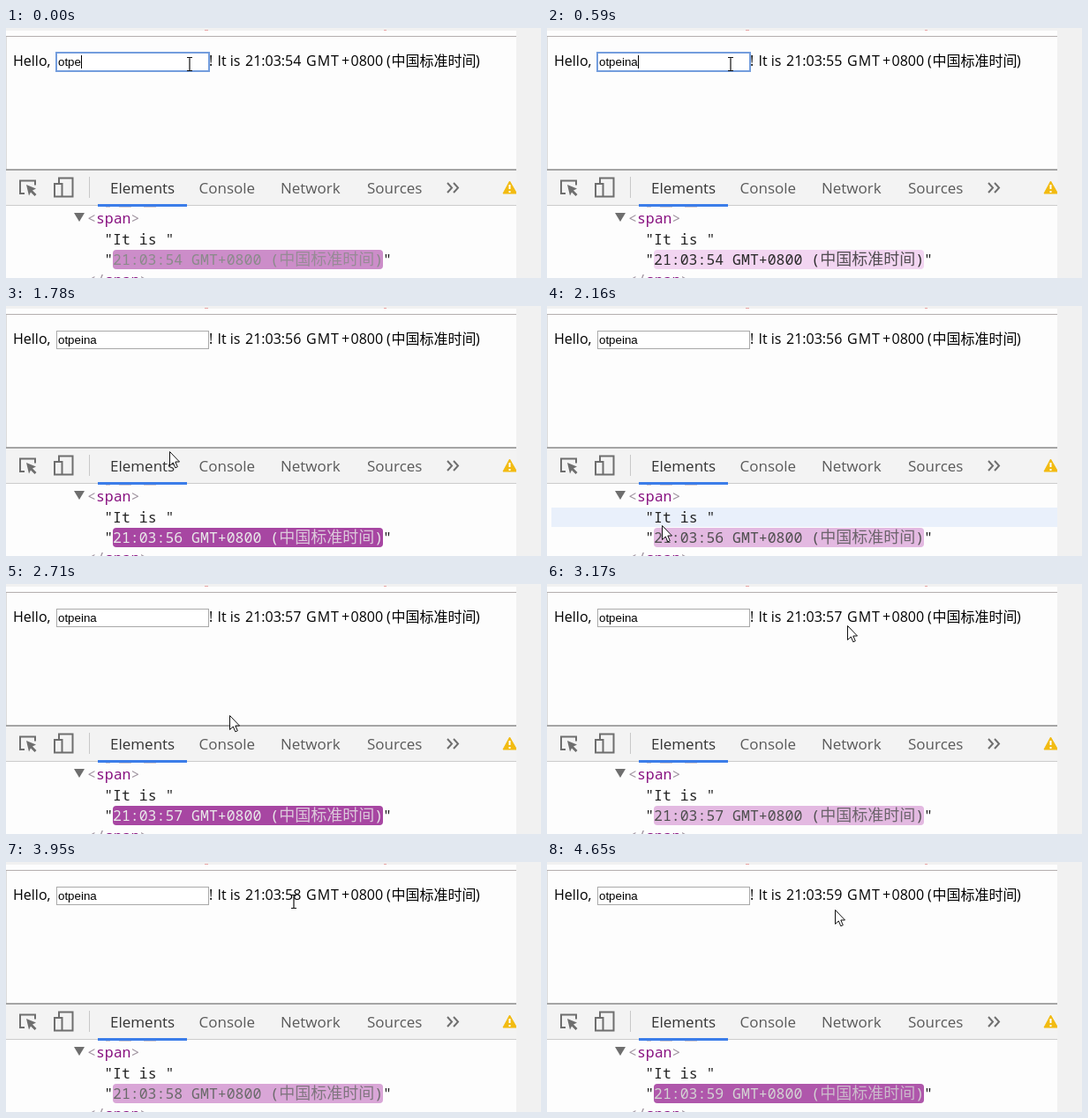
These frames come from a looping animation (606 px wide and 284 px high, 4.89 s). An HTML page:

```html
<!DOCTYPE html>
<html lang="zh">
<head>
<meta charset="utf-8">
<title>Live clock in the inspector</title>
<style>
  html, body { margin: 0; width: 100%; height: 100%; overflow: hidden; background: #f1f1f1; }
  svg { display: block; width: 606px; height: 284px; }
  text { white-space: pre; }
  .page { font: 16px "Open Sans", "Noto Sans", "Noto Sans CJK SC", sans-serif; fill: #000; }
  .cjk { font-family: "Noto Sans CJK SC", "Noto Sans CJK", sans-serif; }
  .field { font: 13.333px "Liberation Sans", Arial, sans-serif; }
  .tab { font: 17px "Open Sans", "Noto Sans", sans-serif; fill: #5a5a5a; }
  .code { font: 16.5px "Noto Sans Mono", "DejaVu Sans Mono", monospace; fill: #222; }
  .code .cjk { font-size: 18px; }
  .tag { fill: #881280; }
  .mark { fill: #a094a0; }
  .icon { fill: none; stroke: #6e6e6e; stroke-width: 2; }
</style>
</head>
<body>
<svg viewBox="0 0 606 284">
  <rect width="606" height="284" fill="#f1f1f1"/>
  <rect y="3" width="578" height="281" fill="#fdfdfd"/>
  <path d="M0 9.5H578" stroke="#b4aeae"/>
  <path d="M.5 10V160" stroke="#dcdcdc"/>
  <path d="M225 2.5h4M428 2.5h3" stroke="#e6a4a4"/>

  <g class="page">
    <text x="8" y="43">Hello,</text>
    <text x="230" y="43">!</text>
    <text x="239.500" y="43">It is</text>
    <text id="clock" x="271" y="43"></text>
    <text x="340" y="43" letter-spacing="1">GMT</text>
    <text x="380" y="43">+</text>
    <text x="390.500" y="43">0800</text>
    <text x="431" y="43">(</text>
    <text class="cjk" x="436.500" y="43">中国标准时间</text>
    <text x="532" y="43">)</text>
  </g>
  <rect id="box" x="57.500" y="28.500" width="172" height="20" fill="#fff" stroke="#a9a9a9"/>
  <rect id="ring" x="57" y="28" width="173" height="21" fill="none" stroke="#739ddd" stroke-width="2"/>
  <text id="typed" class="field" x="59" y="43"></text>
  <rect id="caret" y="31" width="1" height="15"/>

  <rect y="161" width="578" height="41" fill="#f3f3f3"/>
  <path d="M0 161H578" stroke="#a5a5a5" stroke-width="2"/>
  <path d="M0 201.500H578" stroke="#ccc"/>
  <rect x="104" y="200" width="101" height="3" fill="#3b7de9"/>
  <g class="icon">
    <path d="M21 188h-5V173.500h17v5"/>
    <path d="M23 178l11 4.500-4 2 4.500 4.500-2 2-4.500-4.500-2 4z" fill="#6e6e6e" stroke="none"/>
    <path d="M60 176v-5.500h15.500v21H64M55 177h8.500v14.500H55z"/>
  </g>
  <path d="M94.500 169V193" stroke="#c8c8c8"/>
  <g class="tab">
    <text x="118" y="188" fill="#333" style="fill:#333">Elements</text>
    <text x="218.500" y="188">Console</text>
    <text x="311" y="188">Network</text>
    <text x="409" y="188">Sources</text>
  </g>
  <path d="M500 176l5 5.500-5 5.500M507 176l5 5.500-5 5.500" class="icon"/>
  <path d="M570.500 174l7.500 13v1H563z" fill="#f2bb11" stroke="#f2bb11" stroke-linejoin="round"/>
  <path d="M570.500 178v5M570.500 185v2" stroke="#fff" stroke-width="2"/>
  <rect x="578" y="161" width="28" height="40" fill="#f1f1f1"/>

  <rect id="hover" x="5" width="573" height="22" fill="#e9f0fb"/>
  <path d="M113 203.500h5m10 0h14m14 0h14" stroke="#d4cdd4"/>
  <path d="M77 210h12l-6 10z" fill="#6e6e6e"/>
  <g class="code">
    <text x="92" y="222"><tspan class="mark">&lt;</tspan><tspan class="tag">span</tspan><tspan class="mark">&gt;</tspan></text>
    <text x="111.200" y="246">"It is "</text>
    <text x="111.200" y="269">"</text>
    <rect id="pill" x="121" y="252" width="306" height="22" rx="4"/>
    <g id="value">
      <text id="node" x="121" y="269"></text>
      <text class="cjk" x="309.200" y="269" opacity=".8">中国标准时间</text>
      <text x="417.200" y="269">)</text>
    </g>
    <text x="427" y="269">"</text>
    <text x="92" y="292"><tspan class="mark">&lt;/</tspan><tspan class="tag">span</tspan><tspan class="mark">&gt;</tspan></text>
  </g>

  <g id="mouse">
    <path id="arrow" d="M.5 .5V16.500L4.300 13 6.800 18.800 9.300 17.700 6.800 12H11.500z" fill="#fff" stroke="#111"/>
    <path id="beam" d="M-3 -7.500h2.500l.5 .5 .5 -.5h2.500M0 -7V7M-3 7.500h2.500l.5 -.5 .5 .5h2.500" fill="none" stroke="#111" stroke-width="1.200"/>
  </g>
</svg>
<script>
const LOOP = 4890;
const NAME = 'otpeina';
const BLUR = 1690;

const TICKS = [0, 70, 220, 290, 440, 590, 740, 910, 990,
  1140, 1310, 1460, 1540, 1690, 1840, 2010, 2160,
  2310, 2460, 2630, 2700, 2850, 3020, 3170, 3250,
  3400, 3550, 3720, 3800, 3950, 4100, 4270, 4420, 4570, 4650];

const PAGE_SECONDS = [-340, 540, 1560, 2570, 3485, 4500];
const NODE_SECONDS = [-244, 641, 1661, 2671, 3585, 4585];
const KEYS = [220, 290, 440];

// time, x, y
const PATH = [
  [0, 208, 41], [910, 208, 41], [1140, 250, 70], [1310, 250, 70],
  [1690, 185, 165], [2010, 130, 249], [2310, 130, 249], [2850, 300, 110],
  [3170, 340, 47], [3250, 340, 47], [3550, 326, 45], [4270, 326, 45],
  [4420, 326, 54], [LOOP, 326, 54]
];

const $ = id => document.getElementById(id);
const show = (id, on) => $(id).setAttribute('visibility', on ? 'visible' : 'hidden');
const setText = (id, s) => { if ($(id).textContent !== s) $(id).textContent = s; };
const lastIndex = (list, t) => list.reduce((n, v, i) => v <= t ? i : n, 0);
const clockAt = i => '21:03:' + (54 + i);

function fade(el, from, mid) {
  const easing = 'cubic-bezier(0, 0, 0.2, 1)';
  const anim = el.animate([
    { fill: from, easing },
    { fill: mid, offset: 0.8, easing },
    { fill: mid }
  ], { duration: 1400, fill: 'both' });
  anim.pause();
  return anim;
}

const fades = [
  fade($('pill'), 'rgb(158, 54, 153)', 'rgb(245, 219, 244)'),
  ...[...$('value').children].map(el => fade(el, '#fff', '#222'))
];

function mouseAt(t) {
  const i = Math.min(lastIndex(PATH.map(p => p[0]), t), PATH.length - 2);
  const [t0, x0, y0] = PATH[i], [t1, x1, y1] = PATH[i + 1];
  const k = (t - t0) / (t1 - t0);
  return [Math.round(x0 + (x1 - x0) * k), Math.round(y0 + (y1 - y0) * k)];
}

function drawField(t) {
  const focused = t < BLUR;
  const count = 4 + KEYS.filter(k => k <= t).length;
  const lastKey = KEYS.filter(k => k <= t).pop() || 0;
  setText('typed', NAME.slice(0, count));
  $('caret').setAttribute('x', Math.round(59 + $('typed').getComputedTextLength()));
  show('caret', focused && (t - lastKey) % 1060 < 530);
  show('ring', focused);
}

function drawMouse(t) {
  const [x, y] = mouseAt(t);
  const overText = y > 28 && y < 46;
  $('mouse').setAttribute('transform', `translate(${x} ${y})`);
  show('beam', overText);
  show('arrow', !overText);
  const row = Math.floor((y - 206) / 23);
  show('hover', row >= 0);
  $('hover').setAttribute('y', 206 + 23 * Math.max(row, 0));
}

function draw(t) {
  drawField(t);
  drawMouse(t);
  setText('clock', clockAt(lastIndex(PAGE_SECONDS, t)));
  const i = lastIndex(NODE_SECONDS, t);
  setText('node', clockAt(i) + ' GMT+0800 (');
  for (const f of fades) f.currentTime = t - NODE_SECONDS[i];
}

const start = performance.now();
function loop() {
  const t = (performance.now() - start) % LOOP;
  draw(TICKS[lastIndex(TICKS, t)]);
  requestAnimationFrame(loop);
}
loop();
</script>
</body>
</html>
```
